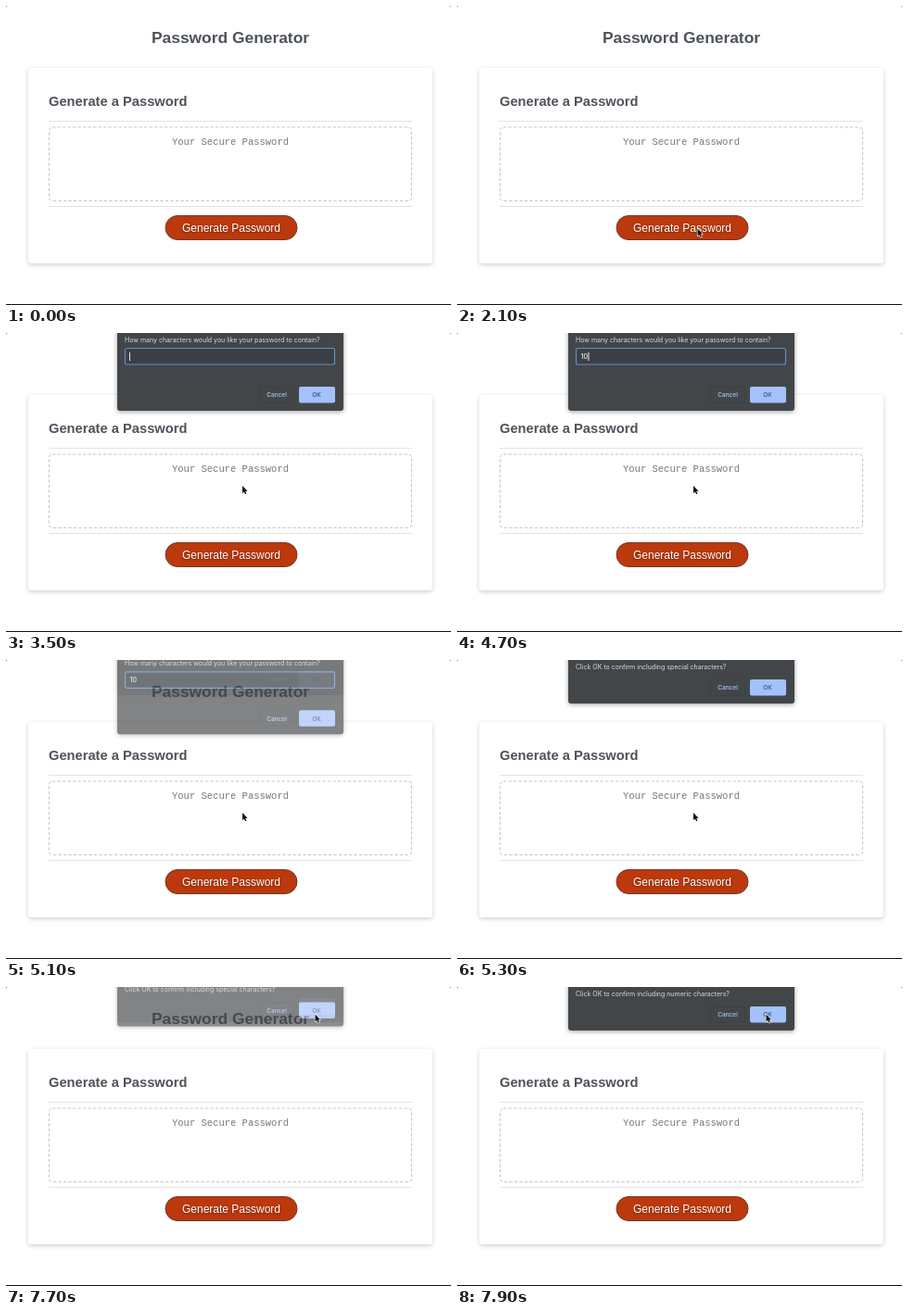
Animation, 480 px wide and 323 px high, one loop 8000 ms. Source, as an HTML page with a canvas:

```html
<!DOCTYPE html>
<html lang="en">
<head>
<meta charset="utf-8">
<title>Password Generator</title>
<style>
  html, body { margin: 0; width: 100%; height: 100%; overflow: hidden; background: #fff; }
  canvas { display: block; }
</style>
</head>
<body>
<canvas id="stage" width="480" height="323"></canvas>
<script>
const W = 480, H = 323, LOOP = 8000, STEP = 100;
const SANS = '"Liberation Sans", Arial, sans-serif';
const MONO = '"Liberation Mono", "Courier New", monospace';
const UI = 'Inter, Roboto, sans-serif';
const stage = document.getElementById('stage').getContext('2d');
const layerCanvas = document.createElement('canvas');
layerCanvas.width = W;
layerCanvas.height = H;
const layer = layerCanvas.getContext('2d');

const clamp = v => Math.min(1, Math.max(0, v));
const progress = (t, from, to) => clamp((t - from) / (to - from));
const smooth = k => k * k * (3 - 2 * k);
const mix = (a, b, k) => a + (b - a) * k;

function box(c, x, y, w, h, r, fill, stroke, width = 1) {
  c.beginPath();
  c.roundRect(x, y, w, h, r);
  if (fill) { c.fillStyle = fill; c.fill(); }
  if (stroke) { c.strokeStyle = stroke; c.lineWidth = width; c.stroke(); }
}

function label(c, text, x, y, font, color, align = 'left') {
  c.font = font;
  c.fillStyle = color;
  c.textAlign = align;
  c.fillText(text, x, y);
}

function shadow(c, color, blur, dy) {
  c.shadowColor = color;
  c.shadowBlur = blur;
  c.shadowOffsetY = dy;
}

function drawPage(c) {
  c.fillStyle = '#fff';
  c.fillRect(0, 0, W, H);
  label(c, 'Password Generator', 242, 40, `bold 17.4px ${SANS}`, '#4d535a', 'center');

  c.save();
  shadow(c, 'rgba(0,0,0,.2)', 5, 1.5);
  box(c, 24, 67, 436, 211, 3, '#fff');
  c.restore();

  label(c, 'Generate a Password', 46, 108, `bold 14.7px ${SANS}`, '#4d535a');
  c.fillStyle = '#e3e3e3';
  c.fillRect(46, 124, 392, 1);
  c.fillRect(46, 216, 392, 1);

  c.save();
  c.setLineDash([3.3, 2.2]);
  box(c, 46.5, 131, 391, 79.5, 3.5, null, '#c4c6c6');
  c.restore();
  label(c, 'Your Secure Password', 242, 149.5, `10.5px ${MONO}`, '#777', 'center');

  box(c, 172, 226.5, 142, 26, 13, '#bb390c', '#71392c');
  c.save();
  shadow(c, 'rgba(60,20,0,.6)', 2, 1);
  label(c, 'Generate Password', 243, 243.5, `12px ${SANS}`, '#fff', 'center');
  c.restore();

  c.fillStyle = '#111';
  c.fillRect(0, 322, W, 1);
  c.fillStyle = '#777';
  c.fillRect(0, 0, 1, 1);
  c.fillRect(W - 1, 0, 1, 1);
}

function drawDialog({ message, bottom, input, caret }, alpha, lift) {
  if (alpha <= 0) return;
  const c = layer;
  c.clearRect(0, 0, W, H);
  c.save();
  c.translate(0, -lift);

  c.save();
  shadow(c, 'rgba(0,0,0,.4)', 5, 1);
  box(c, 120, -40, 244, bottom + 40, 3, '#434649');
  c.restore();
  label(c, message, 128, 9.7, `7px ${UI}`, '#d9dbdd');

  if (input !== undefined) {
    box(c, 128.5, 16.5, 226, 17.5, 2, '#3b4047', '#618dc4', 1.2);
    label(c, input, 133.5, 28, `500 7px ${UI}`, '#f2f3f4');
    if (caret) {
      c.fillStyle = '#e8eaed';
      c.fillRect(133 + (input ? c.measureText(input).width + 1 : 0), 21, 1, 9);
    }
  }

  const top = bottom - 26;
  box(c, 273.5, top + .5, 37, 16.5, 2, null, '#3d4043');
  label(c, 'Cancel', 292, top + 11.2, `500 6.5px ${UI}`, '#a8c7fa', 'center');
  box(c, 316, top, 39, 17.5, 2, '#a3c1fb');
  label(c, 'OK', 335, top + 11.2, `500 6.5px ${UI}`, '#2f5088', 'center');
  c.restore();

  stage.globalAlpha = alpha;
  stage.drawImage(layerCanvas, 0, 0);
  stage.globalAlpha = 1;
}

function drawCursor(c, x, y) {
  const outline = [[0, 0], [0, 8], [1.8, 6.4], [3.1, 9.2], [4.4, 8.6], [3.2, 5.9], [5.5, 5.8]];
  c.beginPath();
  outline.forEach(([dx, dy]) => c.lineTo(x + dx, y + dy));
  c.closePath();
  c.lineJoin = 'round';
  c.lineWidth = 1.2;
  c.strokeStyle = '#fff';
  c.stroke();
  c.fillStyle = '#111';
  c.fill();
}

// Pointer moves: start, end, from, to
const moves = [
  [50, 600, [284, 326], [259.5, 240.5]],
  [2550, 3400, [259.5, 240.5], [255, 165]],
  [5500, 5700, [255, 165], [254, 161]],
  [6880, 7500, [254, 161], [333.5, 29.5]]
];

function pointer(t) {
  const [start, end, a, b] = moves.filter(m => m[0] <= t).pop() || moves[0];
  const k = smooth(progress(t, start, end));
  return [mix(a[0], b[0], k), mix(a[1], b[1], k)];
}

function typed(t) {
  return t < 4300 ? '' : t < 4500 ? '1' : '10';
}

function caretOn(t) {
  return t < 4300 ? Math.floor((t - 2300) / 500) % 2 === 0 : t < 4800;
}

const confirmBox = kind => ({
  message: `Click OK to confirm including ${kind} characters?`,
  bottom: 47
});

// In: slides down while fading in. Out: slides up while fading out.
function showDialog(t, dialog, inFrom, inTo, outFrom, outTo) {
  const enter = progress(t, inFrom, inTo);
  const leave = progress(t, outFrom, outTo);
  drawDialog(dialog, smooth(enter) * (1 - leave), 12 * (1 - enter) + 11 * leave);
}

function render(time) {
  const t = Math.floor((time % LOOP) / STEP) * STEP;
  drawPage(stage);
  showDialog(t, confirmBox('numeric'), 7650, 7850, LOOP, LOOP + 1);
  showDialog(t, confirmBox('special'), 5050, 5250, 7600, 7850);
  showDialog(t, {
    message: 'How many characters would you like your password to contain?',
    bottom: 84,
    input: typed(t),
    caret: caretOn(t)
  }, 2100, 2300, 5000, 5300);
  if (t >= 100) drawCursor(stage, ...pointer(t));
}

let origin;
function tick(now) {
  origin ??= now;
  render(now - origin);
  requestAnimationFrame(tick);
}
render(0);
requestAnimationFrame(tick);
</script>
</body>
</html>
```
